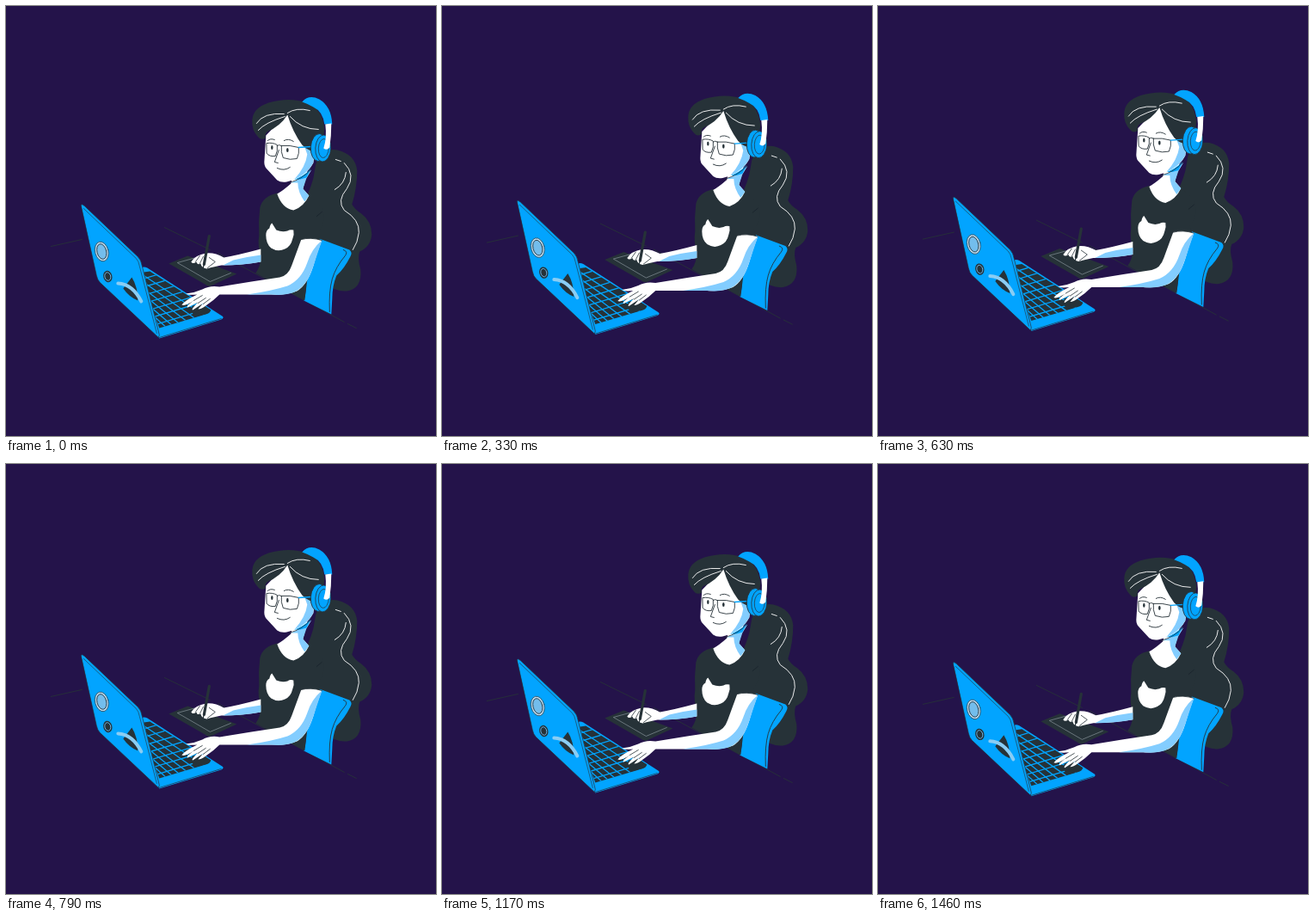
An HTML page with a canvas that plays this animation: 500x500 px, repeating every 1500 ms.

```html
<!DOCTYPE html>
<html lang="en">
<head>
<meta charset="utf-8">
<title>Working at a laptop</title>
<style>
html, body { margin: 0; width: 100%; height: 100%; overflow: hidden; background: #24134a; }
canvas { display: block; width: 500px; height: 500px; }
</style>
</head>
<body>
<canvas id="stage" width="500" height="500"></canvas>
<script>
const ctx = document.getElementById('stage').getContext('2d');
const LOOP = 1500, LIFT = 10, LEAD = 15;
const BG = '#24134a', INK = '#263238', BLUE = '#02a4ff', PALE = '#83cdff', WHITE = '#fff';

const fill = (color, d) => {
  ctx.fillStyle = color;
  ctx.fill(new Path2D(d));
};
const line = (color, width, d) => {
  ctx.strokeStyle = color;
  ctx.lineWidth = width;
  ctx.stroke(new Path2D(d));
};
const oval = (x, y, rx, ry, turn, color, edge, width = 1) => {
  ctx.beginPath();
  ctx.ellipse(x, y, rx, ry, turn, 0, Math.PI * 2);
  if (color) { ctx.fillStyle = color; ctx.fill(); }
  if (edge) { ctx.strokeStyle = edge; ctx.lineWidth = width; ctx.stroke(); }
};

function drawTable() {
  line(INK, 0.9, 'M52 279L88 271M184 257L237 283M246 287L393 367M397 369L407 374');
}

function drawPonytail() {
  fill(INK, 'M360 183Q368 164 385 167Q406 172 408 191Q408 211 402 230Q405 236 413 241Q425 250 425 265Q424 279 411 285Q408 292 412 306Q414 328 396 331Q382 332 372 322L342 235Q352 218 357 200Z');
  line(WHITE, 0.9, 'M383 178L389 180M393 182Q407 196 396 212Q384 226 393 237Q411 248 410 263Q409 274 403 283M382 213Q394 206 395 193');
}

function drawChair() {
  fill(BLUE, 'M364 270L399 283Q403 286 400 291Q393 305 384 313Q379 325 379 340L378 358L346 342Q350 330 347 318Z');
  line(INK, 0.9, 'M392 283Q398 285 394 290Q383 303 379 317Q375 331 376 355');
}

function drawTorso() {
  fill(INK, 'M315 217Q298 221 295 234Q293 250 294 266Q292 278 296 290Q296 302 290 310L347 342L350 318L366 274L362 264Q373 250 367 235Q360 223 347 218Z');
  fill(WHITE, 'M333 197L331 206Q322 214 315 218Q321 235 334 237Q346 233 352 220L345 212L351 188Z');
  fill(PALE, 'M331 205Q343 200 355 190L349 200L345 212L352 220L347 227Q339 216 339 205Z');
  fill(BLUE, 'M334 201Q345 198 354 189L349 199L342 201Z');
  line(INK, 0.8, 'M329 205Q344 201 354 190');
  line('#18222b', 0.8, 'M361 244L367 239');
  fill(WHITE, 'M302 266Q302 260 306 258Q307 253 309 252L314 260Q321 263 327 261Q330 259 334 260Q335 265 333 270Q331 279 324 282Q316 286 308 281Q302 276 302 266Z');
}

function drawTablet() {
  fill(INK, 'M189 299L211 290L268 311L238 325Q235 326 231 323Z');
  line('#87939a', 0.7, 'M221 292L199 298L237 320L261 310');
  fill(WHITE, 'M296 282Q270 289 253 292Q243 286 232 287Q220 289 215 297Q217 300 221 297Q222 301 226 299Q227 304 233 305Q240 303 250 301Q273 301 296 297Z');
  fill(PALE, 'M296 289Q280 291 264 295L252 301Q276 301 296 297Z');
  line(INK, 0.8, 'M220 297L225 290M225 299L229 291M236 292L243 297L234 304');
  line(INK, 3.2, 'M236 267L230 300');
  line(INK, 1.2, 'M230 300L228 307');
}

function drawKeyboard() {
  fill(BLUE, 'M157 304Q160 302 164 304L251 360Q254 362 250 364L178 386L172 376Z');
  ctx.save();
  ctx.clip(new Path2D('M160 309L167 308L238 353Q237 357 232 358L178 374L172 358Z'));
  ctx.fillStyle = INK;
  ctx.fillRect(155, 300, 90, 85);
  for (let i = 0; i < 8; i++) {
    const x = 162 + i * 8.2, y = 315 + i * 7.1;
    line(BLUE, 1.3, `M${x - 50} ${y + 16}L${x + 40} ${y - 11}`);
  }
  for (let i = 0; i < 6; i++) {
    const x = 160 + i * 2.4, y = 313 + i * 9.5;
    line(BLUE, 1.3, `M${x} ${y}l70 ${46 + i * 3.5}`);
  }
  fill(INK, 'M212 351L230 346L238 353L231 358L220 361Z');
  ctx.restore();
  line(INK, 0.7, 'M178 385L250 363');
}

function drawLid() {
  const shell = 'M87 231Q88 229 91 232L153 291Q157 295 158 302L178 382L177 385L109 321Q106 318 105 313Z';
  fill(BLUE, shell);
  line(INK, 0.7, shell);
  line(INK, 0.6, 'M90 235L151 293Q154 296 155 302L175 380');
  oval(111, 285, 7.7, 11.5, -0.25, '#b9dcf2', INK, 0.7);
  oval(111, 285, 5.4, 9, -0.25, '#73bdec', INK, 0.9);
  oval(118, 314, 5.1, 6.8, -0.25, INK);
  oval(118, 314, 3.4, 4.8, -0.25, null, '#73bdec', 0.9);
  fill(INK, 'M146 315L136 328Q143 338 153 342Q153 326 146 315Z');
  line('#8acdf4', 4, 'M130 322Q147 323 157 343');
}

function drawNearArm() {
  fill(WHITE, 'M343 271Q354 268 367 272Q361 287 357 302Q350 324 338 331Q326 336 308 335L248 335Q241 342 232 348Q227 352 223 352L229 345L217 353Q214 353 223 344L211 350Q208 349 218 342Q208 349 204 347Q209 341 222 335Q211 336 209 334Q219 333 228 329Q237 324 248 326L285 320L318 315Q328 313 332 301Z');
  fill(PALE, 'M367 272Q355 282 350 298Q343 318 327 325Q308 331 280 335L308 335Q328 337 339 330Q351 322 357 302Z');
  line(INK, 0.8, 'M343 271Q354 268 367 272M218 342L228 336M223 345L232 339M229 346L237 340');
}

function drawFace() {
  fill(WHITE, 'M302 150L300 181Q300 186 303 189L315 202Q319 205 326 204Q348 199 357 182L360 160L328 123Z');
  fill(PALE, 'M345 158L359 164L357 182Q350 195 335 201Q348 187 350 172Z');
  line(INK, 0.9, 'M303 159Q310 158 315 161Q316 168 313 174Q306 175 303 171ZM320 162Q330 161 340 164Q341 171 338 177Q330 179 322 176Q319 169 320 162M315 162Q317 160 320 162M304 156Q307 153 312 155M323 156Q328 153 334 157');
  oval(309, 164, 1.2, 2.5, 0, INK);
  oval(327, 167, 1.3, 2.6, 0, INK);
  line(INK, 0.9, 'M317 167L312 181L316 182M315 188Q323 192 330 187');
}

function drawHair() {
  fill(INK, 'M293 152Q285 144 286 132Q287 118 305 112Q329 105 350 112Q368 119 370 143L366 169Q352 170 344 161Q333 146 327 126Q319 139 303 146Q300 150 302 153Q296 156 293 152Z');
  line(WHITE, 0.9, 'M291 136Q299 123 323 125M293 144Q301 135 324 128M327 124Q337 117 353 121M330 128Q343 143 363 143');
  line(BLUE, 1.4, 'M340 164L355 163');
}

function drawHeadphones() {
  fill(BLUE, 'M344 111Q352 102 364 108Q378 116 379 137L370 137Q368 122 357 117Q350 113 344 111Z');
  oval(363.5, 164, 9.5, 16, 0.06, BLUE, INK, 0.9);
  oval(368.5, 165, 9, 15.5, 0.06, BLUE, INK, 0.8);
  oval(369, 165, 6, 11, 0.06, null, INK, 0.7);
  fill(WHITE, 'M371 137L378 136Q378 151 376 164Q373 168 369 165Q373 153 371 137Z');
}

const layers = [drawTable, drawPonytail, drawChair, drawTorso, drawTablet, drawKeyboard,
  drawLid, drawNearArm, drawFace, drawHair, drawHeadphones];

function render(now) {
  const phase = ((now + LEAD) % LOOP) / LOOP;
  const lift = LIFT * (1 - Math.abs(1 - 2 * phase));
  ctx.setTransform(1, 0, 0, 1, 0, 0);
  ctx.fillStyle = BG;
  ctx.fillRect(0, 0, 500, 500);
  ctx.translate(0.3, 0.7 - lift);
  ctx.lineCap = ctx.lineJoin = 'round';
  for (const draw of layers) draw();
}

let start;
function tick(now) {
  start ??= now;
  render(now - start);
  requestAnimationFrame(tick);
}
render(0);
requestAnimationFrame(tick);
</script>
</body>
</html>
```
